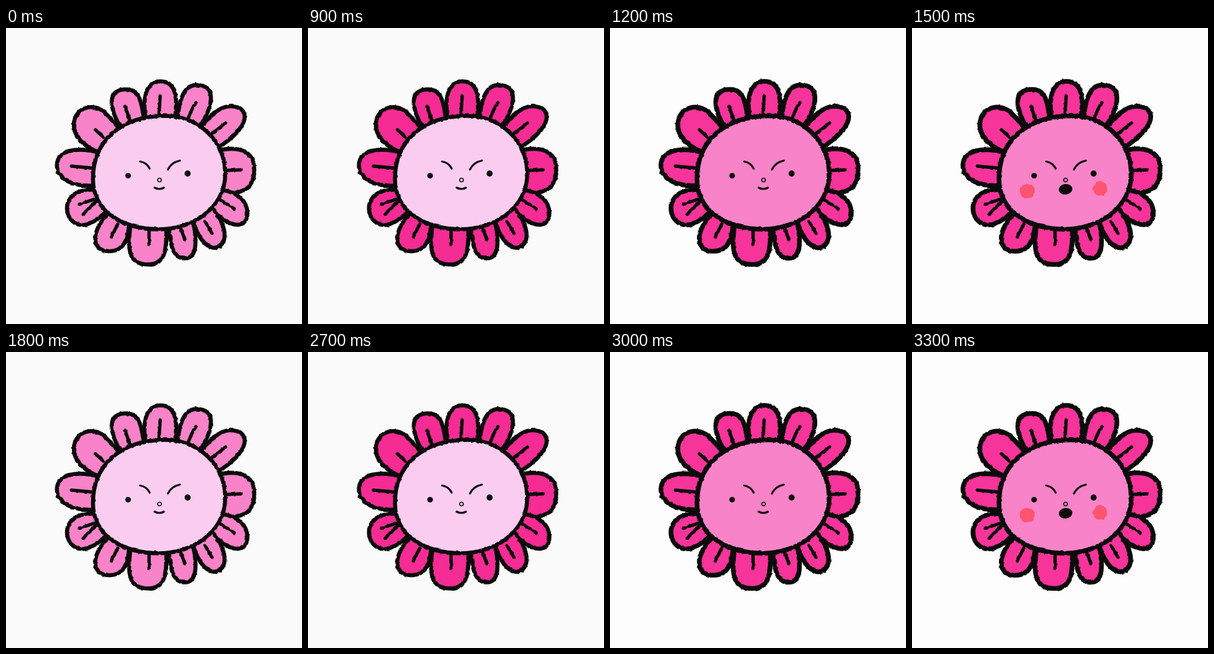
Write an HTML page that moves like this. It is 480 by 480 pixels and loops after 3600 ms.

```html
<!DOCTYPE html>
<html lang="en">
<head>
<meta charset="utf-8">
<title>Blushing flower</title>
<style>
  html, body { margin: 0; width: 100%; height: 100%; overflow: hidden; }
  body { background: #fafafa; animation: paper 1.8s step-end infinite; }
  svg { display: block; width: 100vw; height: 100vh; }
  path { stroke-linecap: round; stroke-linejoin: round; }

  .ink { fill: none; stroke: #0b0b0b; stroke-width: 6.6; }
  .bold { animation: bold 1.8s step-end infinite; }
  .petals { fill: #f983c8; animation: petals 1.8s step-end infinite; }
  .head { fill: #faccf0; animation: head 1.8s step-end infinite; }
  .veins { stroke-width: 5.4; }
  .features { stroke-width: 3.2; }
  .nose { stroke-width: 1.6; }
  .calm { animation: calm 1.8s step-end infinite; }
  .shout { visibility: hidden; animation: shout 1.8s step-end infinite; }

  @keyframes paper { 0% { background: #fafafa } 66.66%, 100% { background: #fdfdfd } }
  @keyframes bold { 0% { stroke-width: 6.6 } 66.66%, 100% { stroke-width: 7.6 } }
  @keyframes petals { 0% { fill: #f983c8 } 50% { fill: #f42c93 } 66.66%, 100% { fill: #f7349a } }
  @keyframes head { 0% { fill: #faccf0 } 66.66%, 100% { fill: #f983c8 } }
  @keyframes calm { 0% { visibility: visible } 83.33%, 100% { visibility: hidden } }
  @keyframes shout { 0% { visibility: hidden } 83.33%, 100% { visibility: visible } }
</style>
</head>
<body>
<svg viewBox="0 0 480 480">
  <defs>
    <filter id="rough" filterUnits="userSpaceOnUse" x="0" y="0" width="480" height="480" color-interpolation-filters="sRGB">
      <feTurbulence type="fractalNoise" baseFrequency=".19" numOctaves="1" seed="4"/>
      <feDisplacementMap in="SourceGraphic" scale="3.6" xChannelSelector="R" yChannelSelector="G"/>
    </filter>
  </defs>

  <g filter="url(#rough)">
    <g class="ink bold">
      <g class="petals">
        <path d="M227 150C222 125 222 87 250 86.5C280 86 278 125 273 150"/>
        <path d="M278 150C281 112 290 94 307 92.5C340 91 339 122 314 160"/>
        <path d="M312 164C332 142 345 128 362 127C399 126 398 162 340 196"/>
        <path d="M340 200C375 190 403 198 402.5 230C403 260 384 274 340 264"/>
        <path d="M345 262C380 266 391 283 391.5 300C391 326 364 328 330 290"/>
        <path d="M335 292C350 312 355 325 354.5 337C353 364 320 368 304 315"/>
        <path d="M303 312C309 340 312 373 290 373.5C268 374 266 345 263 315"/>
        <path d="M260 315C260 350 264 383 230 383.5C193 383 199 350 202 315"/>
        <path d="M200 315C198 345 190 361 169 362C135 363 138 325 170 297"/>
        <path d="M165 295C145 316 130 321 119 319C94 313 90 275 120 265C130 262 140 260 150 261"/>
        <path d="M150 255C110 259 82.5 246 82.5 222C84 197 116 192 155 203"/>
        <path d="M160 205C125 194 109 175 110 155C112 127 145 120 162 139C172 149 182 160 190 172"/>
        <path d="M188 165C167 130 163 100 194 99.5C219 99 220 125 225 155"/>
      </g>
    </g>
    <path class="ink veins" d="M250 110L248 143M308 121Q303 127 296 145M356 154L332 173M381 230L357 231
      M370 293L348 279M334 333L323 314M290 343L283 324M232 351V328M171 339L181 318
      M119 286L142 278M125 302L146 281M106 224L138 227M145 165L158 177M193 127L201 150"/>
    <g class="ink bold">
      <path class="head" d="M141 245C141 183 186 143 258 142.500C315 143 355.500 185 355.500 237C355 290 305 326.500 248 326.500C190 326 141 298 141 245Z"/>
    </g>
    <g class="shout" fill="#ff5470">
      <circle cx="187" cy="265" r="12"/>
      <circle cx="305" cy="260.5" r="11.5"/>
    </g>
  </g>

  <g class="ink features">
    <path d="M217.5 216.5Q228 218 233 228M262.5 229.5Q268 218 282 215"/>
    <circle class="nose" cx="249" cy="246.5" r="3"/>
    <path class="calm" d="M241 259Q249 263 256 259"/>
  </g>
  <g fill="#0b0b0b">
    <circle cx="198" cy="239.5" r="4.6"/>
    <circle cx="294.5" cy="236" r="4.9"/>
    <ellipse class="shout" cx="249" cy="261.5" rx="11" ry="8.5" transform="rotate(-5 249 261)"/>
  </g>
</svg>
</body>
</html>
```
